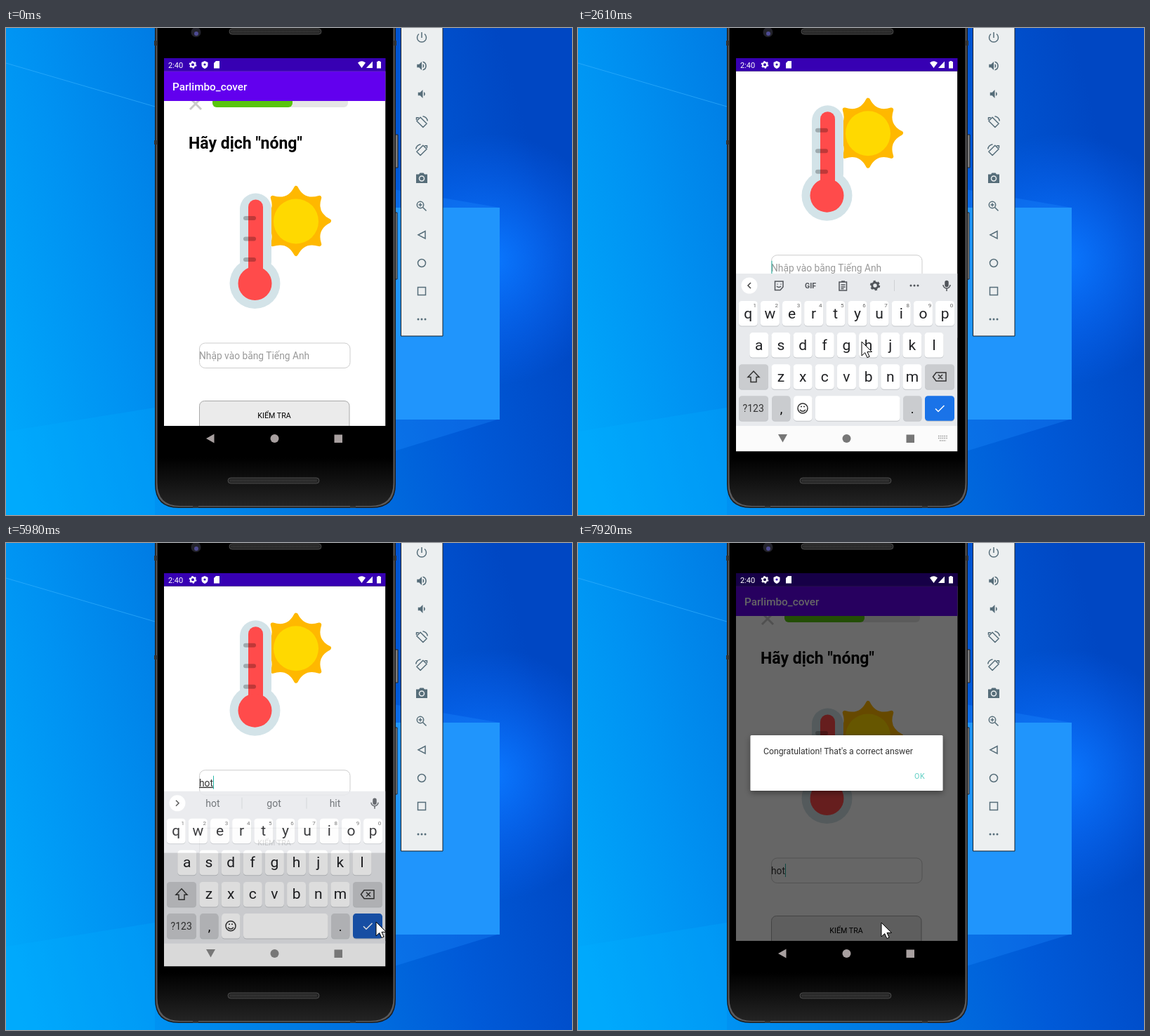
These frames come from a looping animation (806x694 px, 8000 ms). An HTML page:

```html
<!DOCTYPE html>
<html lang="vi">
<head>
<meta charset="utf-8">
<title>Translate exercise</title>
<style>
  html, body { margin: 0; width: 100%; height: 100%; overflow: hidden; background: #0078e0; }
  svg { display: block; width: 806px; height: 694px; font-family: Roboto, sans-serif; }
  .mid { text-anchor: middle; }
  .line { fill: none; stroke: currentColor; stroke-width: 1.5; }
</style>
</head>
<body>
<svg viewBox="0 0 806 694">
  <defs>
    <linearGradient id="sky" gradientUnits="userSpaceOnUse" x1="0" y1="600" x2="806" y2="380">
      <stop offset="0" stop-color="#00a8fb"/><stop offset=".22" stop-color="#0092f2"/>
      <stop offset=".43" stop-color="#007ce4"/><stop offset=".75" stop-color="#005ad8"/>
      <stop offset="1" stop-color="#0047c3"/>
    </linearGradient>
    <radialGradient id="glow" gradientUnits="userSpaceOnUse" cx="690" cy="330" r="180">
      <stop offset="0" stop-color="#0a78ff"/><stop offset="1" stop-color="#0a68ff" stop-opacity="0"/>
    </radialGradient>
    <linearGradient id="edge" x2="0" y2="1">
      <stop offset=".9" stop-color="#000"/><stop offset="1" stop-color="#242424"/>
    </linearGradient>
    <clipPath id="window"><path d="M225 61.5H540.5V567H225z"/></clipPath>
    <clipPath id="page"><path d="M225 61H540.5V567H225z"/></clipPath>
    <clipPath id="screen"><path d="M225 61.5H540.5V603.5H225z"/></clipPath>
    <filter id="shadow" x="-10%" y="-20%" width="120%" height="150%">
      <feDropShadow dx="0" dy="3" stdDeviation="4" flood-opacity=".4"/>
    </filter>
  </defs>

  <!-- Desktop -->
  <rect width="806" height="694" fill="url(#sky)"/>
  <path d="M0 575L212 541V694H0z" fill="#00aeff" opacity=".25"/>
  <path d="M0 50L212 112" stroke="#3bb4ff" opacity=".6"/>
  <rect width="806" height="694" fill="url(#glow)"/>
  <path d="M540 228L703 256V557L540 607z" fill="#1f8dff" opacity=".3"/>
  <rect x="401" y="256" width="302" height="302" fill="#2095fc"/>

  <!-- Phone -->
  <path d="M553 152h5v47h-5zM553 263h4v95h-4z" fill="#7c7c7c" stroke="#222"/>
  <path d="M212-5H555V650Q555 684 521 684H246Q212 684 212 650z" fill="#1c1c1d"/>
  <path d="M213.500-5H553.500V650Q553.500 682.500 521 682.500H246Q213.500 682.500 213.500 650z" fill="#5a5a5c"/>
  <path d="M215.500-5H551.500V648Q551.500 681 519 681H248Q215.500 681 215.500 648z" fill="url(#edge)"/>
  <path d="M211 18h5v7h-5zM211 160h5v6h-5zM551 18h5v7h-5zM266 681h8v3h-8zM490 681h8v3h-8z" fill="#333"/>
  <g fill="#252525" stroke="#4b4b4b">
    <rect x="318" y="1" width="131" height="8" rx="4"/>
    <rect x="316" y="641" width="130" height="8" rx="4"/>
  </g>
  <path d="M321 5H446M319 645H443" stroke="#3c3c3c" stroke-width="3" stroke-dasharray="1 1"/>
  <circle cx="270.500" cy="6" r="7" fill="#23232b"/><circle cx="271" cy="8" r="3" fill="#4d4a93"/>
  <path d="M225 43H540.500V603.500H225z"/>

  <!-- Application -->
  <g clip-path="url(#window)"><g id="app"><g clip-path="url(#page)">
    <path d="M225 61H540.500V567H225z" fill="#fff"/>
    <path d="M262 100L278 116M278 100L262 116" stroke="#c9c9c9" stroke-width="3"/>
    <rect x="294" y="99" width="193" height="14" rx="6" fill="#e5e5e5"/>
    <rect x="294" y="99" width="114" height="14" rx="6" fill="#58c40c"/>
    <text x="260" y="171.500" font-size="23" font-weight="700">Hãy dịch "nóng"</text>
    <path id="sun" fill="#ffb800" stroke="#ffb800" stroke-width="6" stroke-linejoin="round"/>
    <circle cx="413" cy="275.500" r="32" fill="#ffd900"/>
    <g fill="#d3e3e8"><rect x="333" y="235.500" width="45" height="120" rx="22.500"/><circle cx="354.500" cy="364" r="36"/></g>
    <g fill="#ff4b4b"><rect x="345" y="244.500" width="21" height="110" rx="10.500"/><circle cx="354.500" cy="364" r="24"/></g>
    <path d="M341 271h12M341 300.500h12M341 330h12" stroke="#000" stroke-opacity=".25" stroke-width="6" stroke-linecap="round"/>
    <rect x="275.500" y="449" width="214.500" height="35.500" rx="8" fill="#fff" stroke="#cdcdcd"/>
    <text id="field" x="275" y="472" font-size="13.800"></text>
    <path id="caret" d="M0 457V476" stroke="#26b8a8"/>
    <rect x="275.500" y="531.500" width="213.500" height="46" rx="7" fill="#ebebeb" stroke="#a9a9a9"/>
    <text class="mid" x="382" y="556" font-size="10.700">KIỂM TRA</text>
    <path d="M225 61H540.500V104H225z" fill="#6200ee"/>
    <text x="237" y="89" font-size="15.300" font-weight="500" fill="#fff">Parlimbo_cover</text>
  </g></g></g>

  <!-- Keyboard -->
  <g id="keyboard" clip-path="url(#screen)">
    <path d="M225 567H540.500V603.500H225z" fill="#fbfbfb"/>
    <g id="board">
      <path d="M225 350H540.500V567H225z" fill="#e8eaed"/>
      <circle cx="244" cy="367" r="11.500" fill="#fff"/>
      <path id="chevron" class="line" color="#444"/>
      <g id="tools" class="line" color="#50545a"></g>
      <g id="words" class="mid" font-size="14" fill="#5f6368"></g>
      <g class="line" color="#50545a"><rect x="523" y="360.500" width="4" height="8" rx="2" fill="currentColor"/><path d="M520 366a5 5 0 0 0 10 0M525 371v4"/></g>
      <g id="keys"></g>
    </g>
  </g>
  <g id="nav">
    <path id="back"/><circle cx="382.500" cy="585" r="6"/><path d="M467.500 579.500h11.500v11.500h-11.500z"/>
    <path id="switcher" d="M513 581.500h13M513 584.500h13M515 588h9" stroke="#999" stroke-width="1.600" stroke-dasharray="1.600 1.200"/>
  </g>

  <!-- Status bar and dialog -->
  <path d="M225 43H540.500V61.500H225z" fill="#3700b3"/>
  <path id="dim" d="M225 43H540.500V567H225z"/>
  <g fill="#fff" color="#fff">
    <text x="231" y="56.500" font-size="11">2:40</text>
    <g id="statusGear"></g>
    <path d="M283 47l4.500 2v3.500q0 3.500-4.500 5.500q-4.500-2-4.500-5.500v-3.500z"/>
    <circle cx="283" cy="52" r="1.600" fill="#3700b3"/>
    <path d="M299 47h5v10.500h-8v-7.500zM501 49.500q5.500-4.500 11 0l-5.500 7.500zM522 47.500v9.500h-9zM529.500 47h3v1h1.500v9.500h-6v-9.500h1.500z"/>
  </g>
  <g id="dialog">
    <rect x="245.500" y="274" width="274" height="79" rx="1.500" fill="#fff" filter="url(#shadow)"/>
    <text x="264" y="301" font-size="12.260" fill="#333">Congratulation! That's a correct answer</text>
    <text x="479" y="336" font-size="10.700" letter-spacing=".6" fill="#5fcfc4">OK</text>
  </g>

  <!-- Emulator panel -->
  <path d="M562.500-5H622V439H562.500z" fill="#eceff0" stroke="#15202a"/>
  <g id="panel" class="line" color="#566d79"></g>

  <path id="pointer" d="M0 0V20L4.700 15.600 7.900 22.600 11.100 21.200 8 14.400H14.500z" fill="#fff" stroke="#000"/>
</svg>
<script>
const $ = id => document.getElementById(id);
const pitch = 31.15;
const solid = 'fill="currentColor" stroke="none"';
const path = (d, attrs = '') => `<path d="${d}" ${attrs}/>`;
const text = (s, x, y, size, attrs = '') =>
  `<text class="mid" x="${x}" y="${y}" font-size="${size}" ${attrs}>${s}</text>`;
const gear = (x, y, r) => `<g fill="none" stroke="currentColor">
  <circle cx="${x}" cy="${y}" r="${r * .6}" stroke-width="${r * .42}"/>
  <circle cx="${x}" cy="${y}" r="${r * .88}" stroke-width="${r * .3}" stroke-dasharray="${r * .46}"/></g>`;
const dots = (x, y, gap) => [-gap, 0, gap].map(d => `<circle cx="${x + d}" cy="${y}" r="1.5" ${solid}/>`).join('');

// Sun: eight rounded tips joined by hollow curves
const ray = (i, r) => {
  const a = i * Math.PI / 8;
  return `${413 + r * Math.sin(a)} ${275 - r * Math.cos(a)}`;
};
let sun = 'M' + ray(0, 47);
for (let i = 1; i < 16; i += 2) sun += `Q${ray(i, 28)} ${ray(i + 1, 47)}`;
$('sun').setAttribute('d', sun + 'z');
$('statusGear').innerHTML = gear(266, 52.3, 5.2);

// Keyboard
const key = (x, row, w, fill = '#fff', attrs = '') => {
  const y = 389 + row * 45.1;
  return `<rect x="${x}" y="${y + 1}" width="${w}" height="35.500" rx="4.500" fill="#c3c6ca"/>
    <rect x="${x}" y="${y}" width="${w}" height="35.500" rx="4.500" fill="${fill}" ${attrs}/>`;
};
const grey = '#cacccf';
let keys = '';
['qwertyuiop', 'asdfghjkl', 'zxcvbnm'].forEach((letters, row) => {
  [...letters].forEach((letter, i) => {
    const x = [242.2, 257.8, 289][row] + pitch * i;
    keys += key(x - 13.5, row, 27) + text(letter, x, 413.5 + row * 45.1, 21, 'fill="#202124"');
    if (!row) keys += text((i + 1) % 10, x + 9.5, 398, 8, 'fill="#666"');
  });
});
keys += key(229, 2, 42, grey) + key(494, 2, 42, grey) + key(229, 3, 42, grey) + key(276, 3, 26.5, grey)
  + key(307, 3, 26.5) + key(338, 3, 120.5) + key(463, 3, 26.5, grey) + key(494, 3, 42, '#1a73e8', 'id="enter"')
  + text('?123', 249.7, 547, 14, 'fill="#333"') + text(',', 289.5, 549, 18) + text('.', 476, 549, 18)
  + `<g class="line" color="#333">
    ${path('M250 489l8 8.500h-4v7h-8v-7h-4z')}
    ${path('M510 491h14v12h-14l-4.500-6zM513 494l6 6M519 494l-6 6')}
    <circle cx="320" cy="542" r="7"/>${path('M316 544q4 4.500 8 0M317 539.500h2M321 539.500h2')}
    ${path('M509 542.500l4 4 8.500-8.500', 'stroke="#fff"')}</g>`;
$('keys').innerHTML = keys;
$('tools').innerHTML =
  path('M280.500 361h11.500v8l-4 4.500h-7.500zM283 368q3 3 6 0M284 364.500v1M289 364.500v1')
  + text('GIF', 331, 371, 10.5, `font-weight="700" ${solid}`)
  + path('M372 362h10.500v12h-10.500zM375 361h5M374.500 366h6M374.500 369h6M374.500 371.500h4')
  + gear(423, 367, 7) + path('M450.500 359v16', 'stroke="#cfd1d4" stroke-width="1"') + dots(479, 367, 5);

// Emulator buttons; the first helper places shapes drawn on a 24 unit grid
const icon = (y, body, flip = 1) =>
  `<g transform="translate(592 ${y}) scale(${.75 * flip} .75) translate(-12 -12)" stroke-width="2">${body}</g>`;
const speaker = 'M3 9v6h4l5 5V4L7 9zM14 8v8q2.500-1.300 2.500-4t-2.500-4z';
const rotate = path('M9.500 3L2.500 10 14.500 22 21.500 15zM2 8V3M1.500 3.500h5M14 1q8 1.500 9 9', 'stroke-linejoin="round"');
$('panel').innerHTML =
  path('M592 6v8M588 8.500a6.500 6.500 0 1 0 8 0')
  + icon(54, path(speaker + 'M14 3.200v2.100a7 7 0 0 1 0 13.400v2.100a9 9 0 0 0 0-17.600z', solid))
  + icon(94, `<g transform="translate(2 0)">${path(speaker, solid)}</g>`)
  + icon(134, rotate) + icon(174, rotate, -1)
  + path('M584 208.500h4l1.500-2h5l1.500 2h4v12.500h-16z', solid)
  + '<circle cx="592" cy="214.500" r="3.500" stroke="#eceff0"/>'
  + '<circle cx="590" cy="252" r="4.700"/>' + path('M593.500 255.500l5 5M587.500 252h5M590 249.500v5')
  + path('M597 289.500v10.500l-10-5.200z') + '<circle cx="592" cy="335" r="5.500"/>'
  + path('M586.500 369.500h11v11h-11z') + dots(592, 415, 5);

// Timeline
const moves = [
  [70, 653, 630], [670, 421, 469], [830, 419, 470], [1050, 363, 466], [2080, 363, 466],
  [2560, 404, 447], [3100, 404, 449], [3560, 491, 407], [3800, 491, 407], [3950, 338, 425],
  [4300, 363, 405], [4700, 363, 405], [5230, 559, 552], [5440, 559, 552], [5670, 527, 540],
  [6060, 527, 540], [6600, 406, 542], [6750, 406, 542], [7350, 421, 560], [7690, 422, 563], [7900, 432, 541]
];
const typed = [
  [0, '', null], [3010, 'h', ['h', 'hi', 'how']],
  [3730, 'ho', ['ho', 'hi', 'how']], [4590, 'hot', ['hot', 'got', 'hit']]
];
const caretResets = [1050, 1610, 3010, 3730, 4590, 5990];

const ramp = (t, from, to) => Math.min(1, Math.max(0, (t - from) / (to - from)));
const smooth = k => k * k * (3 - 2 * k);
const show = (id, on) => $(id).setAttribute('visibility', on ? 'visible' : 'hidden');

function pointerAt(t) {
  const i = moves.findLastIndex(m => m[0] <= t);
  if (i < 0) return null;
  const [t0, x0, y0] = moves[i], [t1, x1, y1] = moves[i + 1] || [t0 + 1, x0, y0];
  const k = smooth(ramp(t, t0, t1));
  return [x0 + (x1 - x0) * k, y0 + (y1 - y0) * k];
}

let shown = -1;
function setText(i) {
  if (i === shown) return;
  shown = i;
  const [, value, words] = typed[i];
  const field = $('field');
  field.textContent = value || 'Nhập vào bằng Tiếng Anh';
  field.setAttribute('fill', value ? '#333' : '#999');
  $('caret').setAttribute('transform', `translate(${value ? 275.5 + field.getComputedTextLength() : 276})`);
  $('words').innerHTML = words
    ? words.map((w, n) => text(w, 294.5 + 87 * n, 372.5, 14)).join('')
      + path('M336 359v16M428 359v16', 'stroke="#cfd1d4"')
    : '';
  show('tools', !words);
  $('chevron').setAttribute('d', words ? 'M242 363l4 4-4 4' : 'M246 363l-4 4 4 4');
}

function draw() {
  const t = performance.now() % 8000;
  setText(typed.findLastIndex(s => s[0] <= t));
  $('field').setAttribute('text-decoration', t > 3010 && t < 6100 ? 'underline' : 'none');

  const pan = smooth(ramp(t, 1640, 1910)) - smooth(ramp(t, 6180, 6480));
  $('app').setAttribute('transform', `translate(0 ${-125.3 * pan})`);
  const open = ramp(t, 1640, 1910) - ramp(t, 5950, 6180);
  $('keyboard').setAttribute('opacity', open);
  $('board').setAttribute('transform', `translate(0 ${28 * (1 - open)})`);
  $('enter').setAttribute('fill', t > 5830 ? '#1b5abd' : '#1a73e8');

  $('nav').setAttribute('fill', open > .5 ? '#777' : '#a8a0a0');
  $('back').setAttribute('d', open > .5 ? 'M285 579h13l-6.500 11.500z' : 'M296.500 578.500v13l-11.500-6.500z');
  show('switcher', t > 1300 && t < 5970);

  const reset = caretResets.findLast(r => r <= t);
  show('caret', reset && (t > 7450 || (t - reset) % 1000 < 500));

  const alert = ramp(t, 7490, 7610);
  $('dim').setAttribute('opacity', .6 * alert);
  $('dialog').setAttribute('opacity', alert);

  const point = pointerAt(t);
  show('pointer', point);
  if (point) $('pointer').setAttribute('transform', `translate(${point})`);
  requestAnimationFrame(draw);
}
draw();
</script>
</body>
</html>
```
